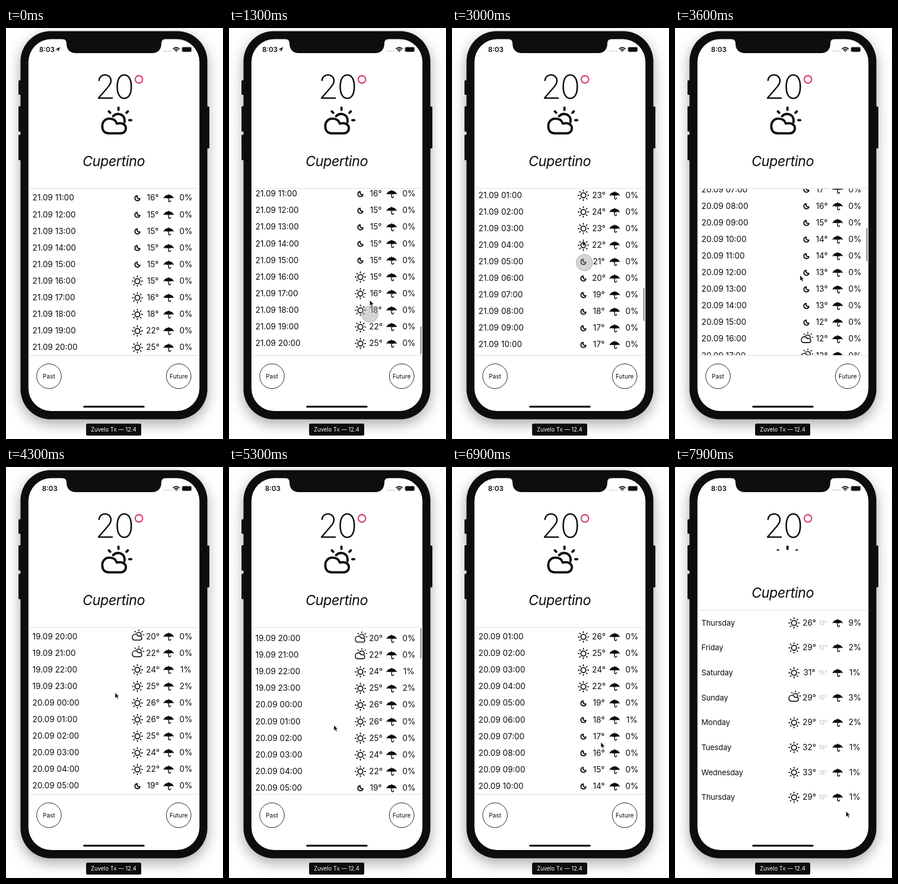
Write an HTML page that moves like this. It is 382 px wide and 720 px high and loops after 8000 ms.

```html
<!DOCTYPE html>
<html lang="en">
<head>
<meta charset="utf-8">
<title>Weather</title>
<style>
  html, body { margin: 0; width: 100%; height: 100%; overflow: hidden; background: #fff; }
  svg { display: block; width: 382px; height: 720px; }
  text { font-family: Inter, Roboto, "Liberation Sans", sans-serif; fill: #0c0c0c; }
  .mid { text-anchor: middle; }
  .row text { font-size: 14.2px; }
  .row .day { font-size: 13.4px; letter-spacing: -.1px; }
  .row .low { font-size: 10.4px; fill: #bdbdbd; }
  .line { fill: none; stroke: #0c0c0c; stroke-linecap: round; stroke-linejoin: round; }
  .btn circle { fill: #fff; stroke: #222; }
  .btn text { font-size: 10.6px; }
  .rule { stroke: #dcdcdc; }
</style>
</head>
<body>
<svg viewBox="0 0 382 720">
  <defs>
    <filter id="shadow" x="-20%" y="-10%" width="140%" height="120%">
      <feDropShadow dx="0" dy="8" stdDeviation="11.5" flood-opacity=".34"/>
    </filter>
    <clipPath id="hourClip"><rect x="39" y="281.5" width="302" height="292"/></clipPath>
    <clipPath id="iconClip"><rect id="iconBox" x="150" y="130" width="90" height="60"/></clipPath>
    <g id="partly" class="line" stroke-width="4">
      <path d="M-14.5 22.5C-22 22.5-26 17.500-26 10C-26 2-20.500-3.200-13.500-3.200C-6.500-3.200-2 .5-.5 5.500C8.500 3 15.500 7 15.500 13.500C15.500 19 11.500 22.500 6.500 22.500Z"/>
      <path d="M-7-7.500C-4-10.500 0-11.800 3.500-11.200C11-10 14.500-4 13 3"/>
      <path d="M2.500-22.500V-18.500M-14.500-16L-12-13.500M19-16L16.500-13.500M21.500-.5H25"/>
    </g>
    <g id="cloud"><use href="#partly" transform="translate(1.500 -2.800) scale(.4)"/></g>
    <g id="sun" class="line" stroke-width="1.8">
      <circle r="4.400"/>
      <g id="rays"></g>
    </g>
    <g id="moon" class="line" stroke-width="1.900">
      <path d="M-.3-4.200A4.400 4.400 0 1 0 4.400 1C1.500 2.200-1.600-.6-.3-4.200Z"/>
    </g>
    <g id="rain">
      <path d="M-9.200 .5C-8-4-3.500-6-.6-6V-7.300H.6V-6C3.500-6 8-4 9.200 .5C6.500-.8 4-.6 2.600 .5C1.200-.6-1.200-.6-2.600 .5C-4-.6-6.500-.8-9.200 .5Z" fill="#0c0c0c"/>
      <path class="line" stroke-width="1.500" d="M0 0V4.300C0 6.900 3.400 6.900 3.400 4.300"/>
    </g>
  </defs>

  <g fill="#0e0e0e">
    <rect x="22" y="91.500" width="6" height="25.500" rx="1.500"/>
    <rect x="22" y="137" width="6" height="44.500" rx="1.500"/>
    <rect x="22" y="187" width="6" height="44.500" rx="1.500"/>
    <rect x="352" y="137.500" width="6" height="73.500" rx="1.500"/>
    <rect x="25.500" y="5.500" width="329" height="680" rx="53" filter="url(#shadow)"/>
  </g>
  <rect x="39.500" y="19.500" width="301" height="651.500" rx="40" fill="#fff"/>
  <path fill="#0e0e0e" d="M99 17H281V19.500C276 19.500 273.500 22 273.500 27C273.500 38 267 44 257 44H123C113 44 106.500 38 106.500 27C106.500 22 104 19.500 99 19.500Z"/>

  <g font-size="12" font-weight="600">
    <g id="located">
      <text x="58.500" y="42">8:03</text>
      <path d="M95.500 33.200L87 37.400L91 37.900L91.400 42Z" fill="#0c0c0c"/>
    </g>
    <text id="plain" x="63.500" y="42">8:03</text>
  </g>
  <path d="M278.500 40.500H291" stroke="#cfcfcf" stroke-width="2.600" stroke-linecap="round" stroke-dasharray="0 3.800"/>
  <g fill="none" stroke="#0c0c0c" stroke-width="1.900">
    <path d="M294 36.700Q299.700 31.600 305.400 36.700M296.300 39Q299.700 36 303.100 39"/>
    <path d="M298 40.300Q299.700 38.800 301.400 40.300L299.700 42Z" fill="#0c0c0c" stroke="none"/>
  </g>
  <rect x="309.700" y="33.300" width="17" height="8.600" rx="2.400" fill="#0c0c0c" stroke="#bbb" stroke-width=".8"/>
  <path d="M328 36.200Q329.600 37.700 328 39.200Z" fill="#888"/>

  <text x="156.800" y="124" font-size="58.500" font-weight="200" letter-spacing="-2.300">20</text>
  <circle cx="234" cy="90" r="6.500" fill="none" stroke="#d9486b" stroke-width="2.300"/>
  <g clip-path="url(#iconClip)"><use href="#partly" transform="translate(195.500 162)"/></g>
  <text id="city" class="mid" x="189.500" y="241.500" font-size="24.300" font-style="italic" letter-spacing="-.4">Cupertino</text>

  <g id="hourly">
    <g clip-path="url(#hourClip)"><g id="hours"></g></g>
    <path class="rule" d="M39.500 573.500H340.500"/>
    <g class="btn mid">
      <circle cx="75.700" cy="610" r="21.700"/><text x="75.700" y="614">Past</text>
      <circle cx="304" cy="610" r="21.700"/><text x="304" y="614">Future</text>
    </g>
  </g>
  <g id="daily"></g>
  <path id="topRule" class="rule" d="M39.500 281H340.500"/>
  <rect id="bar" x="336.600" width="2.300" rx="1.150" fill="#8f8f8f"/>

  <rect x="136" y="661.800" width="108" height="3.200" rx="1.600" fill="#0c0c0c"/>
  <rect x="141" y="693" width="97" height="21" rx="2.500" fill="#0d0d0d"/>
  <text class="mid" x="189.500" y="707.300" font-size="9.800" style="fill:#fff">Zuvelo T<tspan font-size="7.600">K</tspan> — 12.4</text>

  <circle id="touch" r="14.500" fill="#a0a0a0" fill-opacity=".45" stroke="#777" stroke-opacity=".55" stroke-width=".8"/>
  <path id="cursor" d="M0 0V10L2.300 8L4 11.600L5.700 10.800L4.100 7.300H7.200Z" fill="#0c0c0c" stroke="#fff" stroke-width=".7"/>
</svg>
<script>
const $ = id => document.getElementById(id);
const LOOP = 8000, STEP = 100, TOP = 282, PITCH = 29.1, MAX = 1134;

// Tracks are "position value [value]" keys; those in time use tenths of a second.
const track = s => s.split(',').map(k => k.trim().split(' ').map(Number));
const linear = u => u;
const smooth = u => u * u * (3 - 2 * u);
const clamp = u => Math.min(1, Math.max(0, u));

function at(keys, x, ease = linear, col = 1) {
  const n = keys.findIndex(k => k[0] > x);
  if (n < 0) return keys[keys.length - 1][col];
  if (n === 0) return keys[0][col];
  const a = keys[n - 1], b = keys[n];
  return a[col] + (b[col] - a[col]) * ease((x - a[0]) / (b[0] - a[0]));
}

const icon = (id, x, y) => `<use href="#${id}" x="${x}" y="${y}"/>`;
const mid = (s, x, y, cls = '') => `<text class="mid ${cls}" x="${x}" y="${y}">${s}</text>`;
const pad = n => String(n).padStart(2, '0');
const rainCells = (y, rain) => icon('rain', 286.3, y + .8) + mid(rain + '%', 316.7, y + 5);

$('rays').innerHTML = Array.from({ length: 8 }, (_, i) =>
  `<path d="M7.600 0H9" transform="rotate(${i * 45})"/>`).join('');

const warmth = track(`0 20, 2 24, 4 26, 5 26, 7 24, 8 22, 9 19, 14 14, 19 12.3, 20 12,
  30 24, 39 15.6, 44 15, 45 16, 46 18, 48 25`);

function sky(i) {
  const hour = (i + 20) % 24;
  if (i < 2 || i === 20 || i === 21) return 'cloud';
  return hour >= 5 && hour < 16 ? 'moon' : 'sun';
}

function hourRow(i) {
  const h = i + 20, y = TOP + PITCH * (i + .5);
  const date = `${19 + Math.floor(h / 24)}.09 ${pad(h % 24)}:00`;
  const rain = i === 3 ? 2 : i === 2 || i === 10 ? 1 : 0;
  return `<g class="row"><text x="46.5" y="${y + 5}">${date}</text>` +
    icon(sky(i), 231.3, y + .5) + mid(Math.round(at(warmth, i)) + '°', 258.5, y + 5) +
    rainCells(y, rain) + '</g>';
}
$('hours').innerHTML = Array.from({ length: 49 }, (_, i) => hourRow(i)).join('');

const days = `Thursday 26 13 9, Friday 29 12 2, Saturday 31 15 1, Sunday 29 15 3,
  Monday 29 13 2, Tuesday 32 16 1, Wednesday 33 18 1, Thursday 29 16 1`;

$('daily').innerHTML = days.split(',').map((day, i) => {
  const [name, high, low, rain] = day.trim().split(' '), y = 272.7 + 43.65 * i;
  return `<g class="row"><text class="day" x="46.5" y="${y + 5}">${name}</text>` +
    icon(name === 'Sunday' ? 'cloud' : 'sun', 209.5, y + .5) + mid(high + '°', 236.5, y + 5) +
    mid(low + '°', 260.5, y + 4, 'low') + rainCells(y, rain) + '</g>';
}).join('');

const pointer = track(`8 262 556, 11 248 511, 17 247 379, 23 247 379, 26 250 622, 30 230 372,
  33 220 433, 36 220 433, 43 192 395, 49 192 395, 52 184.5 452, 53 184.5 452, 57 207 500,
  60.3 207 371, 61 207 371, 66 218 352, 69 262 482, 72 301 603`);
// Scroll: pull past the end, fling to the start, pull past the start, drag on.
const pull = track(`11 ${MAX}, 19 ${MAX + 46}, 23.7 ${MAX}, 42.9 0, 49 0, 51 -34, 53.5 0, 58 0, 61 125, 66 145`);
const touches = track('11 19, 24 27, 30 33, 50 51, 58 64, 73 74');
const scrolls = track('12 41, 50 67');

// 1 inside any span, falling to 0 over the fade time on either side.
const during = (spans, x, fade) =>
  Math.max(...spans.map(([a, b]) => clamp(1 - Math.max(a - x, x - b) / fade)));

const set = (id, name, value) => $(id).setAttribute(name, value);
const fade = (id, value) => set(id, 'opacity', value);
const move = (id, x, y) => set(id, 'transform', `translate(${x} ${y})`);
const place = (id, x) => move(id, at(pointer, x, smooth), at(pointer, x, smooth, 2));

function draw(x) {
  const scroll = at(pull, x, smooth);
  move('hours', 0, -scroll);

  const inside = clamp(scroll / MAX);
  const size = 58.5 - 1.5 * Math.abs(scroll - inside * MAX) ** .95;
  set('bar', 'y', scroll > MAX ? 571.5 - size : 282.5 + inside * 230.5);
  set('bar', 'height', Math.max(8, size));
  fade('bar', during(scrolls, x, 2));

  place('cursor', x);
  fade('cursor', x < 8 ? 0 : 1);
  // The touch mark trails the pointer by one step.
  place('touch', x - 1);
  fade('touch', during(touches, x, 1));

  const gone = clamp((x - 24) / 2);
  fade('located', 1 - gone);
  fade('plain', gone);

  const p = 1 - (1 - clamp((x - 74) / 5)) ** 2, swap = clamp((x - 74) / 2);
  move('city', 0, -13 * p);
  move('topRule', 0, -30 * p);
  move('daily', 0, 30 * (1 - p));
  set('iconBox', 'height', 60 - 43.5 * p);
  fade('hourly', 1 - swap);
  fade('daily', swap);
}

function tick() {
  draw(Math.floor(performance.now() % LOOP / STEP));
  requestAnimationFrame(tick);
}
tick();
</script>
</body>
</html>
```
